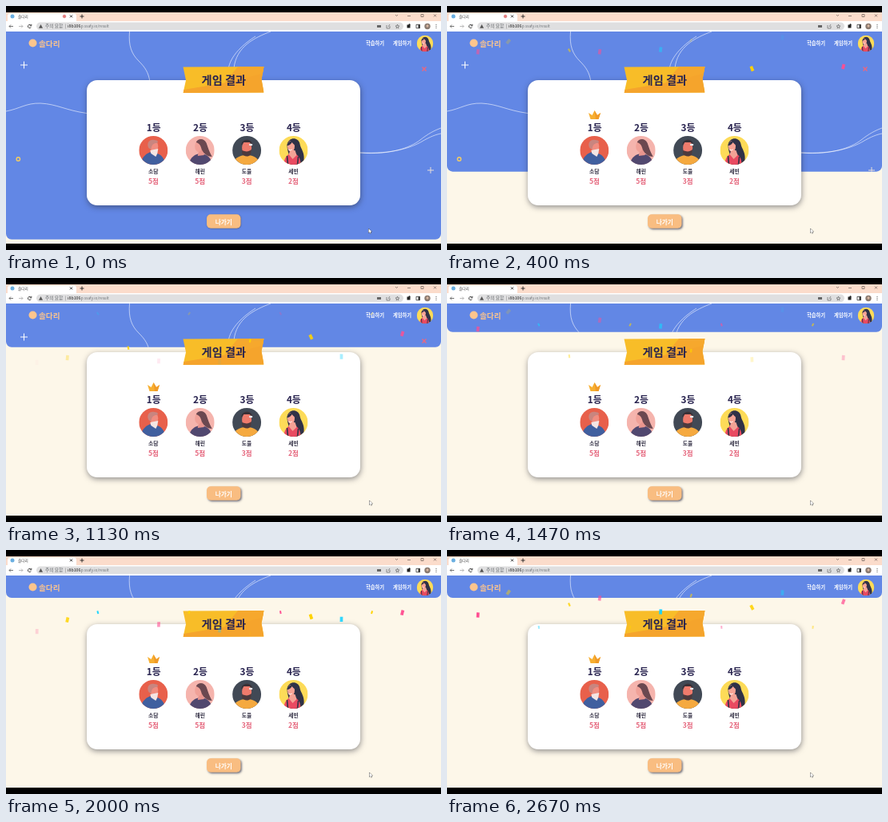
Recreate the animation shown at these times as an HTML page with a canvas. Size 544x306 px, loop 2.74 s.

```html
<!DOCTYPE html>
<html lang="ko">
<head>
<meta charset="utf-8">
<title>게임 결과</title>
<style>
html, body { margin: 0; width: 100%; height: 100%; overflow: hidden; background: #000; }
canvas { display: block; width: 544px; height: 306px; }
</style>
</head>
<body>
<canvas id="stage"></canvas>
<script>
const W = 544, H = 306, LOOP = 2740, STEP = 200 / 3;
const canvas = document.getElementById('stage');
const ratio = window.devicePixelRatio || 1;
canvas.width = W * ratio;
canvas.height = H * ratio;
const c = canvas.getContext('2d');

const BLUE = '#6287e5', CREAM = '#fdf7e9', INK = '#28234f', PINK = '#e5657c', PEACH = '#f9bd81';
const BRAND = '솔다리';

const clamp = v => Math.max(0, Math.min(1, v));

function bezier(x1, y1, x2, y2) {
  const at = (a, b, s) => 3 * a * s * (1 - s) ** 2 + 3 * b * s * s * (1 - s) + s ** 3;
  return x => {
    if (x <= 0) return 0;
    if (x >= 1) return 1;
    let lo = 0, hi = 1;
    for (let i = 0; i < 24; i++) {
      const mid = (lo + hi) / 2;
      if (at(x1, x2, mid) < x) lo = mid; else hi = mid;
    }
    return at(y1, y2, lo);
  };
}
const ease = bezier(.25, .1, .25, 1);
const easeOut = bezier(0, 0, .58, 1);

function text(str, x, y, size, weight, color, align = 'center') {
  c.font = `${weight} ${size}px "Noto Sans CJK KR", "Noto Sans CJK", "Noto Sans", sans-serif`;
  c.textAlign = align;
  c.textBaseline = 'middle';
  c.fillStyle = color;
  c.fillText(str, x, y);
}
function rect(x, y, w, h, color) {
  c.fillStyle = color;
  c.fillRect(x, y, w, h);
}
function round(x, y, w, h, r, color) {
  c.beginPath();
  c.roundRect(x, y, w, h, r);
  c.fillStyle = color;
  c.fill();
}
function oval(x, y, rx, ry, color, turn = 0) {
  c.beginPath();
  c.ellipse(x, y, rx, ry, turn, 0, 7);
  c.fillStyle = color;
  c.fill();
}
function fillPath(d, color) {
  c.fillStyle = color;
  c.fill(new Path2D(d));
}
function line(d, color, width = .7) {
  c.strokeStyle = color;
  c.lineWidth = width;
  c.stroke(new Path2D(d));
}
function ring(x, y, r, color, width) {
  c.beginPath();
  c.arc(x, y, r, 0, 7);
  c.strokeStyle = color;
  c.lineWidth = width;
  c.stroke();
}
function shadowed(color, blur, dx, dy, draw) {
  c.save();
  c.shadowColor = color;
  c.shadowBlur = blur * ratio;
  c.shadowOffsetX = dx * ratio;
  c.shadowOffsetY = dy * ratio;
  draw();
  c.restore();
}

// Portraits live in a 36 x 36 box centred on the origin.
const portraits = [
  () => {
    fillPath('M-16 18C-15 8-8 3-2 2L5 4C11 6 14 11 15 18Z', '#405f9f');
    oval(1, -5, 5, 7, '#f08d80');
    fillPath('M-6-3C-9-9-5-14 1-13C6-13 7-10 4-9C0-9-2-7-3-1Z', '#c9857f');
    fillPath('M-4 0L6-2L5 4L3 8L-3 4Z', '#f3e5e4');
  },
  () => {
    fillPath('M-14 18C-13 9-6 4 1 4C10 5 14 10 15 18Z', '#51486f');
    fillPath('M-1-2L5-1L5 6L-3 7Z', '#e9958e');
    oval(-2, -5, 4.5, 7, '#f0a198');
    fillPath('M-5-10C-3-15 5-16 8-9C10-3 12 3 15 8C10 8 5 5 2-1C1-6-1-9-5-10Z', '#6b4850');
  },
  () => {
    fillPath('M-18 18C-16 9-8 6 0 6C9 6 15 10 17 18Z', '#f5a93f');
    oval(0, -3, 6, 9, '#ef7b6c');
    fillPath('M-7-6C-7-15 7-16 7-6L4-10H-4Z', '#3a3036');
    fillPath('M-6 0C-1 2 2 2 6-1L5 5C2 9-4 8-6 4Z', '#4d3a3d');
    oval(5, -7, 2.3, 1.3, '#eceef0');
  },
  () => {
    fillPath('M-8-7C-6-17 6-17 8-8C9-1 16 3 12 18H-4C-2 10-8 4-8-7Z', '#303247');
    fillPath('M-12 18C-12 8-6 3 0 4C6 5 9 10 9 18Z', '#e94a61');
    fillPath('M-4 0H2L4 6L-1 11L-6 5Z', '#f4a296');
    oval(-3, -5, 4.5, 7, '#f7a395');
    fillPath('M-8-6C-6-14 4-15 6-5C3-5 0-8-2-10C-3-8-5-6-8-6Z', '#303247');
    line('M-6-1Q-4 1-2-1', '#fff', 1);
    line('M-8 7L-7 18M6 8L5 18', '#303247', 1.6);
  }
];
const backdrops = ['#e8604b', '#f5b4ad', '#414955', '#fddb58'];

function portrait(i, x, y, r) {
  c.save();
  c.translate(x, y);
  c.scale(r / 18, r / 18);
  c.beginPath();
  c.arc(0, 0, 18, 0, 7);
  c.clip();
  rect(-18, -18, 36, 36, backdrops[i]);
  portraits[i]();
  c.restore();
}

function browser(time) {
  rect(0, 8, W, 12, '#fbdccb');
  round(2, 9.5, 86, 12, [3, 3, 0, 0], '#fff');
  rect(0, 19, W, 13, '#fff');
  oval(8, 13, 2.5, 2.5, '#6aaee0');
  text(BRAND, 15, 13, 4.6, 400, '#444', 'left');
  c.globalAlpha = 1 - clamp((time - 560) / 460);
  ring(73, 13, 1.8, '#d95c5c', .8);
  oval(73, 13, .9, .9, '#d93b3b');
  c.globalAlpha = 1;
  line('M80 11.4L83 14.4M83 11.4L80 14.4M95 10.5V15.5M92.5 13H97.5', '#222', .9);
  line('M487 11L488.5 12.5L490 11M502 12.5H506M519 10.5H522V13.5H519ZM535 10.5L538 13.5M538 10.5L535 13.5', '#564b46', .6);

  line('M9 25.5H4M6 23.5L4 25.5L6 27.5', '#555', .8);
  line('M16 25.5H21M19 23.5L21 25.5L19 27.5', '#aaa', .8);
  c.beginPath();
  c.arc(29.5, 25.5, 2.1, .5, 5.6);
  c.strokeStyle = '#333';
  c.lineWidth = .9;
  c.stroke();
  line('M31.8 22.8V24.8H29.8', '#333', .9);
  round(38, 20.5, 459, 9.6, 4.8, '#dfdfe0');
  fillPath('M43.5 23L46 27.7H41Z', '#555');
  text('주의 요함', 49, 25.3, 5.7, 400, '#666a6e', 'left');
  rect(74.2, 22.5, .6, 6, '#999');
  text('i8b106', 77, 25.3, 5.3, 400, '#222', 'left');
  text('.p.ssafy.io/result', 92.5, 25.3, 4.7, 400, '#6c7074', 'left');
  rect(464, 24, 5, 3, '#666');
  line('M476 24V28H480V25M478 26L480 23', '#666', .7);
  line('M489.5 23L490.2 25H492L490.5 26.2L491 28L489.5 27L488 28L488.5 26.2L487 25H488.8Z', '#555', .6);
  rect(501.5, 23.5, 4, 4, '#222');
  oval(504.5, 23.4, 1.1, 1.1, '#222');
  line('M513 23.3H517.5V27.8H513Z', '#333', .8);
  rect(515.5, 23.3, 2, 4.5, '#333');
  oval(527, 25.5, 3.7, 3.7, '#8a7a70');
  oval(527, 25, 1.5, 1.8, '#d8b6a0');
  for (let i = 0; i < 3; i++) oval(538, 23.5 + i * 2, .6, .6, '#444');
}

function backdrop(bottom) {
  rect(0, 32, W, 266, CREAM);
  c.save();
  c.beginPath();
  c.roundRect(0, 32, W, bottom - 32, [0, 0, 7, 7]);
  c.clip();
  rect(0, 32, W, 266, BLUE);
  const pale = 'rgba(255,255,255,.82)';
  line('M154.5 32C153 50 157 60 166 69C174 77 178 83 180 95', pale);
  line('M331 32C310 40 288 51 285 78', pale);
  line('M312 38C298 47 280 62 278 80', pale);
  line('M0 132C17 129 25 121.5 43 122C64 123 75 131 101 134.5', pale);
  line('M443 184C480 187 505 178 518 168C528 160 536 156 544 153', pale);
  line('M443 184C484 186 508 177 520 170C530 164 538 161 544 160', pale);
  line('M22.5 69.5V78.5M18 74H27', '#fff', 1);
  line('M520.5 76.5L525.5 81.5M525.5 76.5L520.5 81.5', '#e56883', 1.5);
  ring(15.3, 192, 2.2, '#f5cd62', 1.4);
  line('M531 202V210M527 206H535', '#e6dcd8', 1);
  c.restore();
}

function header() {
  oval(33.5, 46.5, 5, 5, '#fdc58d');
  text(BRAND, 41, 47, 9.6, 700, '#fdc58d', 'left');
  text('학습하기', 461.5, 47, 6.3, 700, '#fff');
  text('게임하기', 495.5, 47, 6.3, 700, '#fff');
  portrait(3, 524, 47, 10.3);
}

const players = [['소담', 5], ['해린', 5], ['도율', 3], ['세빈', 2]];

function card(time) {
  shadowed('rgba(40,40,50,.5)', 7, .5, 2.2, () => round(101, 93, 342, 157, 13, '#fff'));

  const ribbon = 'M221.5 76.5L322.5 76L319.5 92L322.5 108.5L221.5 109L225 93Z';
  fillPath(ribbon, '#f8bd28');
  c.save();
  c.clip(new Path2D(ribbon));
  fillPath('M222 105L276 96L322 80V110H222Z', '#f5a42c');
  fillPath('M290 76H323V84L272 98Z', '#f6a82d');
  c.restore();
  text('게임 결과', 272.3, 92.5, 14.2, 700, INK);

  c.globalAlpha = clamp((time - 60) / 240);
  fillPath('M177 134L181.5 137L184.5 131L188 137L192 134L189.5 142H179.5Z', '#f7af31');
  fillPath('M184.5 131L188 137L192 134L189.5 142H186Z', '#f09a27');
  c.globalAlpha = 1;

  players.forEach(([name, score], i) => {
    const x = 184.3 + i * 58.4;
    text(`${i + 1}등`, x + .3, 152.5, 11.8, 700, INK);
    portrait(i, x, 181, 18);
    text(name, x, 207.9, 6.8, 700, '#302d42');
    text(`${score}점`, x, 219.7, 8.5, 700, PINK);
  });
}

function button(time) {
  const lift = clamp(time / 200);
  shadowed('rgba(70,70,90,.75)', 1.5 + lift, .4 + lift, .4 + lift,
    () => round(251, 261.3, 42.5, 17.5, 5, PEACH));
  text('나가기', 272.3, 270.7, 7.7, 700, '#fff');
}

// [start, duration, tilt] for pieces 1 to 13
const slow = 2500, late = 936;
const confetti = [
  [200, 1000, 8], [314, 1090, 45], [late, slow, -40], [38, 2000, -45], [177, 1116, 12],
  [late, slow, 38], [225, 1010, 10], [270, 2000, 30], [late, slow, -30], [67, 775, -55],
  [363, 1065, 4], [late, slow, 42], [85, 788, 35]
];

function drawConfetti(time) {
  confetti.forEach(([start, duration, tilt], i) => {
    if (time < start) return;
    const n = i + 1;
    const phase = (time - start) / duration % 1;
    const fall = easeOut(phase);
    const [w, h] = n % 3 === 0 ? [2, 3.8] : n % 4 === 0 ? [2.2, 4.4] : [3.7, 6.3];
    c.save();
    c.globalAlpha = phase < .5 ? easeOut(phase * 2) : 1 - easeOut(phase * 2 - 1);
    c.translate(W * .07 * n + .6, 35.5 + 71 * fall);
    c.rotate(tilt * (1 - fall) * Math.PI / 180);
    rect(-w / 2, -h / 2, w, h, n % 2 === 0 ? '#ffd300' : n % 4 === 1 ? '#ff4e91' : '#17d3ff');
    c.restore();
  });
}

function cursor(time) {
  c.save();
  c.translate(time < 66 ? 453.5 : 454.5, 279.2);
  const arrow = 'M0 0V5.2L1.3 4.1L2.2 6L3 5.6L2.2 3.8H3.8Z';
  line(arrow, '#333', .8);
  fillPath(arrow, '#fff');
  c.restore();
}

function draw(time) {
  c.setTransform(ratio, 0, 0, ratio, 0, 0);
  rect(0, 0, W, H, '#000');
  browser(time);
  backdrop(298 - 238 * ease((time + 74) / 2000));
  header();
  card(time);
  button(time);
  drawConfetti(time);
  cursor(time);
}

// The picture advances at 15 steps per second, on 10 ms boundaries.
const stepStart = k => Math.round(k * STEP / 10) * 10;
function held(time) {
  let k = Math.floor(time / STEP) + 1;
  while (stepStart(k) > time) k--;
  return Math.min(k, 40) * STEP;
}

const origin = performance.now();
function tick() {
  draw(held((performance.now() - origin) % LOOP));
  requestAnimationFrame(tick);
}
tick();
</script>
</body>
</html>
```
